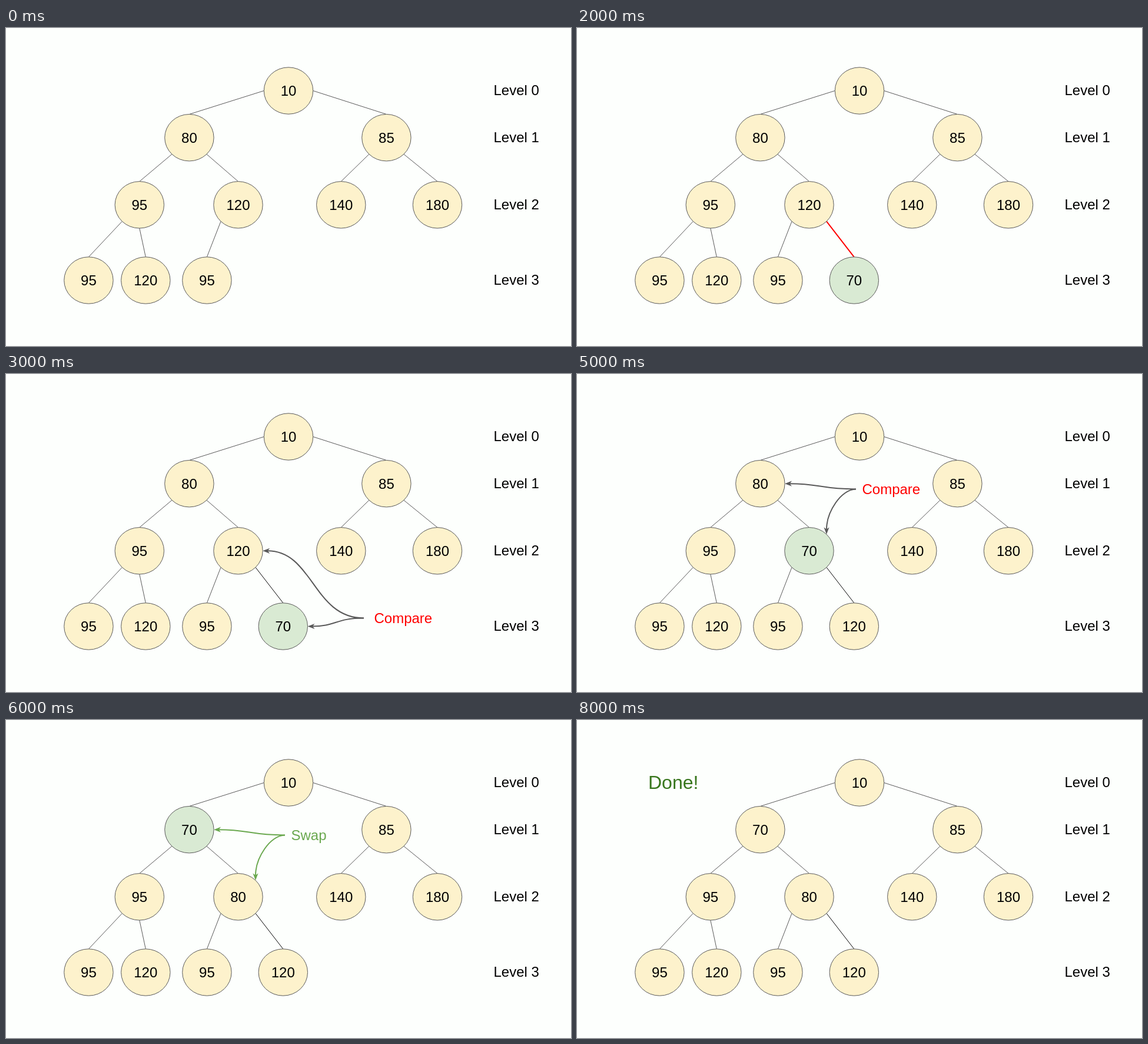
An HTML page for the animation above (9 s loop, 960x540 px).

```html
<!DOCTYPE html>
<html lang="en">
<head>
<meta charset="utf-8">
<title>Heap insertion</title>
<style>
  html, body { margin: 0; width: 100%; height: 100%; overflow: hidden; background: #fdfffd; }
  svg { display: block; width: 960px; height: 540px; }
  text { font: 24px "Liberation Sans", Arial, sans-serif; }
</style>
</head>
<body>
<svg id="stage" viewBox="0 0 960 540"></svg>
<script>
const GRAY = '#595959', RED = '#ff0000', GREEN = '#6aa84f', DARK_GREEN = '#38761d';
const CREAM = '#fdf2cc', MINT = '#d9ead3';
const STEP_MS = 1000, RX = 41.7, RY = 39.7;
const RIGHT = 0, LOWER_RIGHT = 45, BOTTOM = 90, LOWER_LEFT = 135;
const LEFT = 180, UPPER_LEFT = 225, TOP = 270, UPPER_RIGHT = 315;

// Tree slots in heap order: the parent of slot i is (i - 1) >> 1
const slotX = [480, 311.4, 646.4, 226.8, 394.5, 569.3, 733, 140.4, 237.3, 341.4, 470.8];
const levelY = [106.5, 186.2, 300.3, 428.5];
const parentOf = i => (i - 1) >> 1;
const slotY = i => levelY[Math.floor(Math.log2(i + 1))];

const stage = document.getElementById('stage');

function add(tag, attrs, label) {
  const el = document.createElementNS('http://www.w3.org/2000/svg', tag);
  for (const key in attrs) el.setAttribute(key, attrs[key]);
  if (label !== undefined) el.textContent = label;
  stage.appendChild(el);
}

const write = (x, y, label, fill = '#000', size = 24, anchor = 'start') =>
  add('text', { x, y, fill, 'text-anchor': anchor, style: `font-size:${size}px` }, label);

const stroke = (d, color, width) =>
  add('path', { d, fill: 'none', stroke: color, 'stroke-width': width });

// Point on the rim of a slot's ellipse, angle clockwise from the right
function rim(i, angle) {
  const a = angle * Math.PI / 180;
  return [slotX[i] + RX * Math.cos(a), slotY(i) + RY * Math.sin(a)];
}

function drawNode(cx, cy, value, fill) {
  add('ellipse', { cx, cy, rx: RX, ry: RY, fill, stroke: GRAY, 'stroke-width': 1 });
  write(cx, cy + 8.5, value, '#000', 24, 'middle');
}

function drawEdge(i, color) {
  const parent = parentOf(i), dx = slotX[i] - slotX[parent];
  let angle = dx < 0 ? LOWER_LEFT : LOWER_RIGHT;
  if (parent === 0) angle = dx < 0 ? LEFT : RIGHT;
  else if (Math.abs(dx) < RX / 2) angle = BOTTOM;
  stroke(`M${rim(parent, angle)}L${rim(i, TOP)}`, color, color === RED ? 2 : 1);
}

function drawHead(x, y, angle, color, scale = 1) {
  add('path', {
    d: 'M0 0L-12 -4.6L-8.5 0L-12 4.6Z', fill: color,
    transform: `translate(${x} ${y}) rotate(${angle}) scale(${scale})`
  });
}

// Curve that leaves sideways and meets a rim from the right, or else from above
function connect(x, y, i, angle, color) {
  const [tx, ty] = rim(i, angle);
  const mx = (x + tx) / 2, my = (y + ty) / 2;
  if (angle === RIGHT) {
    stroke(`M${x} ${y}C${mx} ${y} ${mx} ${ty} ${tx + 8} ${ty}`, color, 2);
    drawHead(tx, ty, 180, color);
  } else {
    stroke(`M${x} ${y}C${mx} ${y} ${tx} ${my} ${tx} ${ty - 8}`, color, 2);
    drawHead(tx, ty, 90, color);
  }
}

// Where the note for a child slot sits and which rims its arrows touch
const callouts = {
  10: { x: 608, y: 414.5, textX: 625.5, parentRim: RIGHT, childRim: RIGHT, swapColor: DARK_GREEN },
  4: { x: 474, y: 195.5, textX: 484.5, parentRim: RIGHT, childRim: UPPER_RIGHT, swapColor: GREEN },
  1: { x: 255, y: 62, textX: 146, parentRim: UPPER_LEFT, childRim: UPPER_LEFT }
};

function callout(child, swapped) {
  const { x, y, textX, parentRim, childRim, swapColor } = callouts[child];
  const color = swapped ? GREEN : GRAY;
  connect(x, y, parentOf(child), parentRim, color);
  connect(x, y, child, childRim, color);
  write(textX, y + 8.3, swapped ? 'Swap' : 'Compare', swapped ? swapColor : RED);
}

function newNode(value) {
  drawNode(147.7, 91, value, MINT);
  stroke('M91 205.5C60 198 31 172 27.5 138C27.5 117 47 93 82 90', GRAY, 3);
  drawHead(95.5, 89.6, -2, GRAY, 1.45);
  write(93.5, 213, 'New node', RED);
}

// Run the insertion and record a picture at every stage
function insertion(heap, value) {
  const steps = [];
  const record = (hot, edge, note) => steps.push({ heap: [...heap], hot, edge, note });
  record();
  record(-1, GRAY, () => newNode(value));
  let i = heap.push(value) - 1;
  record(i, RED);
  while (i > 0) {
    const child = i, parent = parentOf(i);
    record(i, '#000', () => callout(child, false));
    if (heap[parent] <= value) break;
    [heap[parent], heap[i]] = [heap[i], heap[parent]];
    i = parent;
    record(i, '#000', () => callout(child, true));
  }
  record(-1, '#000', () => write(121, 116.5, 'Done!', DARK_GREEN, 32));
  return steps;
}

const steps = insertion([10, 80, 85, 95, 120, 140, 180, 95, 120, 95], 70);
const lastSlot = slotX.length - 1;

function show({ heap, hot, edge, note }) {
  stage.replaceChildren();
  for (let i = 1; i < heap.length; i++) drawEdge(i, i === lastSlot ? edge : GRAY);
  heap.forEach((value, i) => drawNode(slotX[i], slotY(i), value, i === hot ? MINT : CREAM));
  levelY.forEach((y, i) => write(828.5, y + 7.8, 'Level ' + i));
  if (note) note();
}

const start = performance.now();
let current = -1;
function tick() {
  const index = Math.floor((performance.now() - start) / STEP_MS) % steps.length;
  if (index !== current) show(steps[current = index]);
  requestAnimationFrame(tick);
}
tick();
</script>
</body>
</html>
```
